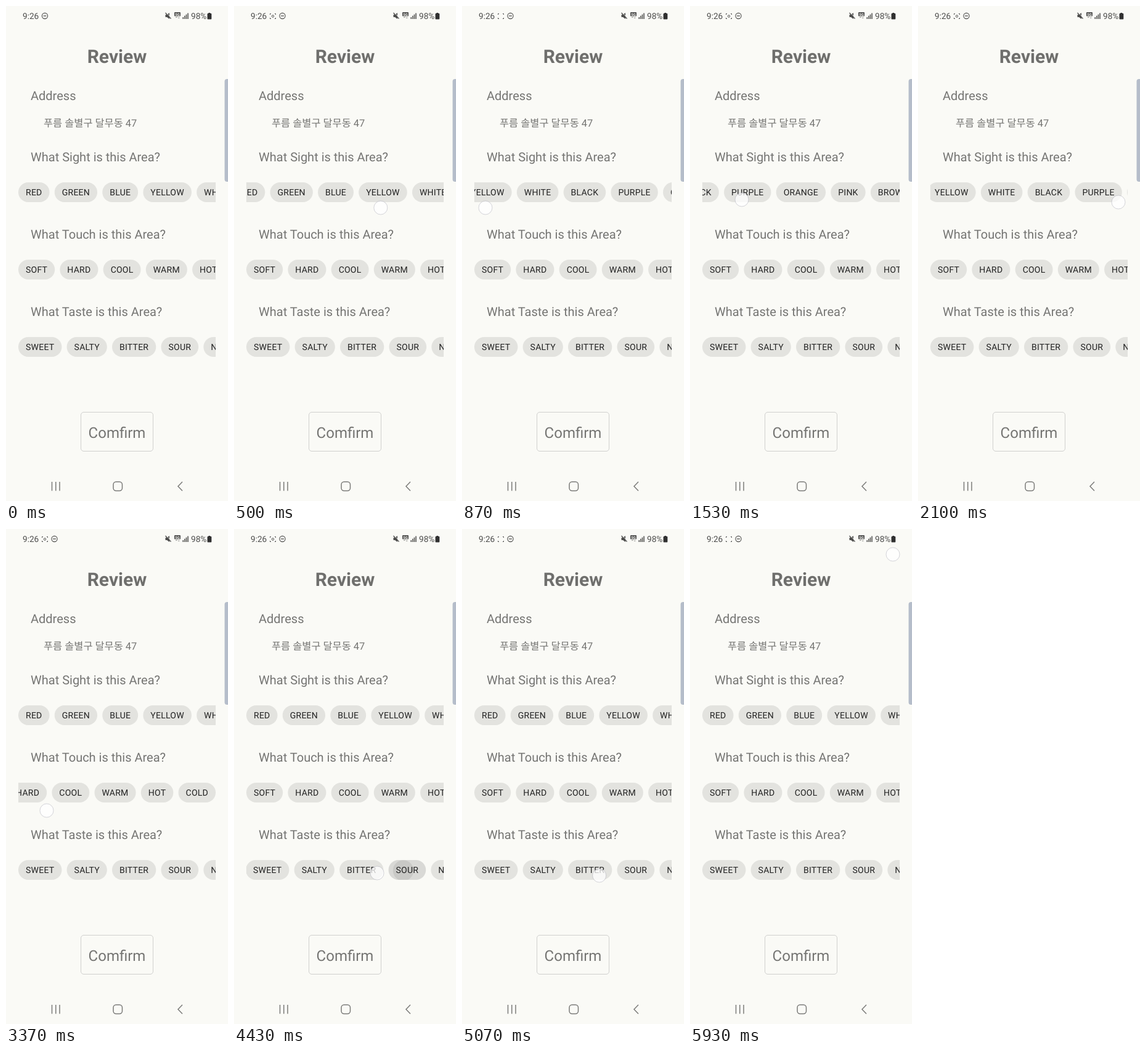
An HTML page with a canvas for the animation above (5960 ms loop, 360 by 800 pixels).

```html
<!DOCTYPE html>
<html lang="en">
<head>
<meta charset="utf-8">
<title>Review</title>
<style>
html, body { margin: 0; width: 100%; height: 100%; overflow: hidden; background: #fafaf6; }
canvas { display: block; width: 360px; height: 800px; }
</style>
</head>
<body>
<canvas id="stage"></canvas>
<script>
const W = 360, H = 800, LOOP = 5960;
const FONT = 'Roboto, "Noto Sans CJK KR", "Noto Sans CJK", sans-serif';
const COLOR = {
  page: '#fafaf6', chip: '#e3e3df', chipText: '#222', text: '#757573',
  title: '#6f6f6d', status: '#4d4d4c', faint: '#a5a5a3', nav: '#7b7b79',
  line: '#d0d0ce', handle: '#b5bdca'
};
const LEFT = 20, VIEW = 320, CHIP_HEIGHT = 32, PADDING = 12, GAP = 8.2;
const SLOP = 42, FLING = 0.12, FLING_TIME = 90;

const canvas = document.getElementById('stage');
const ctx = canvas.getContext('2d');
const ratio = window.devicePixelRatio || 1;
canvas.width = W * ratio;
canvas.height = H * ratio;
ctx.textRendering = 'geometricPrecision';

const swipe = (start, end, from, to, drop) => ({ start, end, from, to, drop });

const rows = [
  {
    sense: 'Sight',
    labels: 'RED GREEN BLUE YELLOW WHITE BLACK PURPLE ORANGE PINK BROWN',
    swipes: [swipe(330, 870, 300, 38, 41), swipe(1200, 1530, 286, 84, 28),
      swipe(1800, 2080, 70, 325, 32), swipe(2200, 2480, 80, 320, 32)]
  },
  {
    sense: 'Touch',
    labels: 'SOFT HARD COOL WARM HOT COLD',
    swipes: [swipe(2930, 3370, 200, 66, 45), swipe(3600, 3880, 80, 290, 40)]
  },
  {
    sense: 'Taste',
    labels: 'SWEET SALTY BITTER SOUR NUTTY',
    swipes: [swipe(4340, 4640, 275, 80, 21), swipe(4900, 5180, 90, 290, 25)]
  }
].map((row, i) => ({ ...row, y: 285 + 125 * i, labels: row.labels.split(' ') }));

const clamp = (v, low = 0, high = 1) => Math.max(low, Math.min(high, v));
const smooth = k => k * k * (3 - 2 * k);

function fingerX({ start, end, from, to }, t) {
  return from + (to - from) * smooth(clamp((t - start) / (end - start)));
}

// Each swipe drags the row once past the touch slop, then glides on a little.
function scrollAt(swipes, t, limit) {
  return swipes.reduce((offset, s) => {
    const moved = s.from - fingerX(s, t);
    const drag = Math.sign(moved) * Math.max(0, Math.abs(moved) - SLOP);
    const glide = FLING * (1 - Math.exp(-Math.max(0, t - s.end) / FLING_TIME));
    return clamp(offset + drag * (1 + glide), 0, limit);
  }, 0);
}

function text(str, x, y, size, color, align = 'left', weight = 400) {
  ctx.font = `${weight} ${size}px ${FONT}`;
  ctx.textAlign = align;
  ctx.fillStyle = color;
  ctx.fillText(str, x, y);
}

function fillBox(color, x, y, w, h, r = 0) {
  ctx.fillStyle = color;
  ctx.beginPath();
  ctx.roundRect(x, y, w, h, r);
  ctx.fill();
}

function strokeBox(color, width, x, y, w, h, r) {
  ctx.strokeStyle = color;
  ctx.lineWidth = width;
  ctx.beginPath();
  ctx.roundRect(x, y, w, h, r);
  ctx.stroke();
}

function circle(x, y, r) {
  ctx.beginPath();
  ctx.arc(x, y, r, 0, Math.PI * 2);
}

function path(d, color, width) {
  const shape = new Path2D(d);
  if (width) {
    ctx.strokeStyle = color;
    ctx.lineWidth = width;
    ctx.stroke(shape);
  } else {
    ctx.fillStyle = color;
    ctx.fill(shape);
  }
}

function drawCaptureIcon(t) {
  for (const sx of [-1, 1]) {
    for (const sy of [-1, 1]) {
      const x = 63 + 4.5 * sx, y = 16.5 + 4 * sy;
      path(`M${x} ${y - 1.5 * sy}V${y}H${x - 1.5 * sx}`, COLOR.status, 1);
    }
  }
  const phase = t % 1000;
  if (phase < 90 || phase >= 590) return;
  circle(63, 16.5, 1.7);
  ctx.stroke();
}

function drawStatus(t) {
  const c = COLOR.status;
  const recording = t >= 270;
  const x = recording ? 78.5 : 63;
  text('9:26', 27, 21, 13.6, c);
  if (recording) drawCaptureIcon(t);
  ctx.strokeStyle = c;
  ctx.lineWidth = 1.1;
  circle(x, 16, 4.6);
  ctx.stroke();
  path(`M${x - 2.5} 16h5`, c, 1.2);

  path('M258.5 14h2.5l4-3v10l-4-3h-2.5z', c);
  path('M259.5 10.5l9 9.5', COLOR.page, 1);
  path('M258.5 11l9 9.5', c, 1.3);

  fillBox(c, 273, 10, 10, 6.5, 1);
  text('5G', 278, 15.5, 6, COLOR.page, 'center', 700);
  path('M274.5 19l1.8-2 1.7 2zM278.5 18.5l1.7 2 1.8-2z', COLOR.faint);
  for (let i = 0; i < 4; i++) fillBox(c, 286.5 + i * 2.6, 18 - i * 2.2, 1.5, 3 + i * 2.2);
  text('98%', 300, 21, 13.6, c);
  fillBox('#303030', 328.3, 11, 3, 2);
  fillBox('#303030', 326.5, 12, 6.8, 9.5, 1);
}

function drawRipple(x, y, w, age) {
  if (age < 0 || age > 300) return;
  const fade = 1 - clamp((age - 120) / 180);
  ctx.save();
  ctx.beginPath();
  ctx.roundRect(x, y, w, CHIP_HEIGHT, CHIP_HEIGHT / 2);
  ctx.clip();
  ctx.fillStyle = `rgba(40,40,40,${0.05 * fade})`;
  ctx.fillRect(x, y, w, CHIP_HEIGHT);
  ctx.fillStyle = `rgba(40,40,40,${0.09 * fade})`;
  circle(x + 24, y + 17, 9 + age * 0.085);
  ctx.fill();
  ctx.restore();
}

function drawRow({ y, sense, labels, swipes }, t) {
  text(`What ${sense} is this Area?`, 40, y - 34, 20, COLOR.text);
  ctx.save();
  ctx.beginPath();
  ctx.rect(LEFT, y - 1, VIEW, CHIP_HEIGHT + 2);
  ctx.clip();
  ctx.letterSpacing = '0.25px';
  ctx.font = `400 14px ${FONT}`;
  const widths = labels.map(label => ctx.measureText(label).width + 2 * PADDING);
  const total = widths.reduce((sum, w) => sum + w + GAP, -GAP);
  let x = LEFT - scrollAt(swipes, t, total - VIEW);
  labels.forEach((label, i) => {
    fillBox(COLOR.chip, x, y, widths[i], CHIP_HEIGHT, CHIP_HEIGHT / 2);
    if (label === 'SOUR') drawRipple(x, y, widths[i], t - swipes[0].start);
    text(label, x + PADDING, y + 21, 14, COLOR.chipText);
    x += widths[i] + GAP;
  });
  ctx.restore();
}

function drawFinger(x, y) {
  circle(x, y, 11);
  ctx.fillStyle = 'rgba(255,255,255,0.75)';
  ctx.fill();
  ctx.strokeStyle = 'rgba(150,150,165,0.4)';
  ctx.lineWidth = 1;
  ctx.stroke();
}

function drawTouches(t) {
  for (const row of rows) {
    for (const s of row.swipes) {
      if (t >= s.start && t <= s.end + 30) drawFinger(fingerX(s, t), row.y + s.drop);
    }
  }
  if (t >= 5830) drawFinger(329, 41);
}

function drawNavigation() {
  for (let i = 0; i < 3; i++) path(`M${74.5 + i * 6.25} 769v14.5`, COLOR.nav, 1.5);
  strokeBox(COLOR.nav, 1.5, 174, 769, 14.5, 14.5, 4.5);
  path('M286 769l-7 7.2 7 7.3', COLOR.nav, 1.5);
}

function draw(t) {
  ctx.setTransform(ratio, 0, 0, ratio, 0, 0);
  fillBox(COLOR.page, 0, 0, W, H);
  drawStatus(t);

  text('Review', 180, 92, 30, COLOR.title, 'center', 700);
  text('Address', 40, 152, 20, COLOR.text);
  text('푸름 솔별구 달무동 47', 61, 195, 16.4, COLOR.text);
  rows.forEach(row => drawRow(row, t));

  strokeBox(COLOR.line, 1, 121.5, 656.5, 117, 63, 4.5);
  text('Comfirm', 180, 697.5, 24, COLOR.text, 'center');
  fillBox(COLOR.handle, 354.5, 118, 10, 166, 4);
  drawNavigation();
  drawTouches(t);
}

const began = performance.now();
function tick() {
  draw((performance.now() - began) % LOOP);
  requestAnimationFrame(tick);
}
tick();
</script>
</body>
</html>
```
